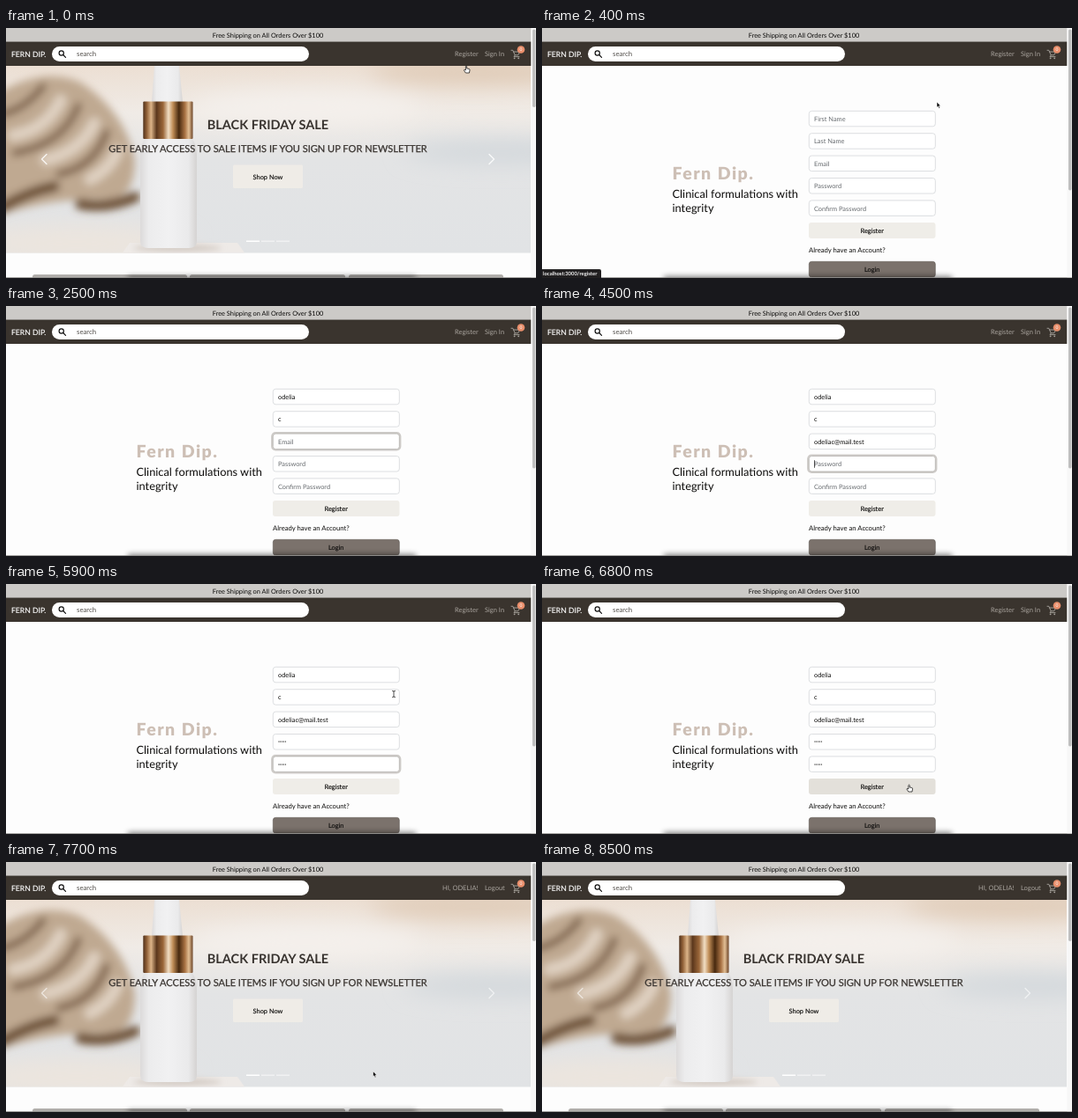
An HTML page that plays this animation: 600 by 284 pixels, repeating every 8.6 s.

```html
<!DOCTYPE html>
<html lang="en">
<head>
<meta charset="utf-8">
<title>Skincare shop sign-up</title>
<style>
  html, body { margin: 0; width: 100%; height: 100%; overflow: hidden; background: #fdfdfd; }
  svg { display: block; width: 100%; height: 100%; }
  text { font: 7.4px Lato, sans-serif; fill: #0d0c0b; text-rendering: geometricPrecision; white-space: pre; }
  .mid { text-anchor: middle; }
  .medium { stroke: #0d0c0b; stroke-width: .15px; }
  .nav text { font-size: 7.5px; fill: #aaa59f; }
  .nav .logo { font-size: 8.6px; fill: #fff; stroke: #fff; stroke-width: .15px; }
  .nav .search { font-size: 7.8px; fill: #55514d; }
  .title { font-size: 14.5px; font-weight: 700; fill: #38332f; }
  .sub { font-size: 11.05px; fill: #38332f; stroke: #38332f; stroke-width: .25px; }
  .brand { font-size: 19.5px; font-weight: 900; letter-spacing: 1.5px; fill: #cdbfb5; }
  .slogan { font-size: 12.8px; }
  .status text { font-size: 5.9px; font-weight: 700; fill: #f4f4f4; }
  .field text.empty { fill: #666a6e; }
  .field text.dots { font-size: 3.2px; }
  .line { fill: none; stroke-linecap: round; stroke-linejoin: round; }
</style>
</head>
<body>
<svg viewBox="0 0 600 284" preserveAspectRatio="none">
  <defs>
    <clipPath id="heroClip"><rect y="43" width="594" height="212.5"/></clipPath>
    <filter id="soft" x="-50%" y="-50%" width="200%" height="200%"><feGaussianBlur stdDeviation="5"/></filter>
    <filter id="haze" x="-50%" y="-80%" width="200%" height="260%"><feGaussianBlur stdDeviation="12"/></filter>
    <filter id="shade" x="-20%" y="-200%" width="140%" height="500%"><feGaussianBlur stdDeviation="3"/></filter>
    <linearGradient id="wall" x2="0" y2="1">
      <stop stop-color="#ecdfd3"/><stop offset=".25" stop-color="#f0ebe6"/>
      <stop offset=".5" stop-color="#e3e4e5"/><stop offset="1" stop-color="#e1e3e5"/>
    </linearGradient>
    <linearGradient id="gold">
      <stop stop-color="#4f301a"/><stop offset=".07" stop-color="#8f5f36"/><stop offset=".16" stop-color="#dcb488"/>
      <stop offset=".27" stop-color="#5c381d"/><stop offset=".4" stop-color="#9a6639"/><stop offset=".51" stop-color="#f1dec4"/>
      <stop offset=".6" stop-color="#c08d57"/><stop offset=".72" stop-color="#47290f"/><stop offset=".84" stop-color="#a87243"/>
      <stop offset=".92" stop-color="#e2bf95"/><stop offset="1" stop-color="#6b4326"/>
    </linearGradient>
    <linearGradient id="glass">
      <stop stop-color="#dcdada"/><stop offset=".15" stop-color="#ececed"/><stop offset=".5" stop-color="#f1f1f2"/>
      <stop offset=".85" stop-color="#eaeaeb"/><stop offset="1" stop-color="#d5d3d2"/>
    </linearGradient>
  </defs>

  <rect width="600" height="284" fill="#fdfdfd"/>

  <g id="home">
    <g clip-path="url(#heroClip)">
      <rect y="43" width="594" height="213" fill="url(#wall)"/>
      <g filter="url(#haze)">
        <ellipse cx="530" cy="50" rx="120" ry="14" fill="#dfcab6"/>
        <ellipse cx="340" cy="90" rx="130" ry="20" fill="#f4f0ec"/>
        <ellipse cx="560" cy="140" rx="110" ry="14" fill="#d3d8dc"/>
        <ellipse cx="80" cy="245" rx="130" ry="22" fill="#ece5de"/>
      </g>
      <g filter="url(#soft)">
        <path fill="#bfa991" d="M-15 78Q40 42 85 62Q135 95 146 150Q146 190 120 196Q60 190 -15 215Z"/>
        <g class="line">
          <path stroke="#e0d2c2" stroke-width="13" d="M8 122Q45 116 62 82M45 150Q85 140 100 108M95 172Q118 160 126 140"/>
          <path stroke="#73573d" stroke-width="7" d="M-5 98Q22 92 42 66M10 142Q65 132 82 88M60 166Q100 158 114 118"/>
          <path stroke="#6a4d33" stroke-width="12" d="M-5 204Q25 186 55 180M84 200Q115 206 146 192"/>
        </g>
      </g>
      <path d="M140 244H262L272 258H130Z" fill="#eeeae7"/>
      <ellipse cx="194" cy="250" rx="50" ry="4" fill="#d3cbc4" filter="url(#shade)"/>
      <path d="M168 43H196L200 84H165Z" fill="url(#glass)"/>
      <path d="M158 125H210Q216 132 216 144V242Q216 250 207 250H161Q152 250 152 242V144Q152 132 158 125Z" fill="url(#glass)"/>
      <rect x="155.300" y="83.500" width="56.200" height="42.500" rx="1" fill="url(#gold)"/>
    </g>
    <text class="title mid" x="296.500" y="115.200">BLACK FRIDAY SALE</text>
    <text class="sub mid" x="296.500" y="141.200">GET EARLY ACCESS TO SALE ITEMS IF YOU SIGN UP FOR NEWSLETTER</text>
    <rect x="257" y="155.500" width="79" height="26.500" rx="1.500" fill="#efece7"/>
    <text class="mid medium" x="296.500" y="171.500">Shop Now</text>
    <path id="arrows" class="line" stroke="#fff" stroke-width="1.300" d="M46 143.500L40.500 149L46 154.500M547 143.500L552.500 149L547 154.500"/>
    <g fill="#fff">
      <rect x="272" y="241.500" width="15" height="1.500"/>
      <rect x="289" y="241.500" width="15" height="1.500" opacity=".5"/>
      <rect x="306" y="241.500" width="15" height="1.500" opacity=".5"/>
    </g>
    <g id="cards" fill="#b1aeab">
      <rect x="30" y="280" width="175" height="10" rx="2.500"/>
      <rect x="208" y="280" width="176" height="10" rx="2.500"/>
      <rect x="388" y="280" width="175" height="10" rx="2.500"/>
    </g>
  </g>

  <g id="signup">
    <text class="brand" x="147.500" y="172">Fern Dip.</text>
    <text class="slogan" x="147.500" y="193">Clinical formulations with</text>
    <text class="slogan" x="147.500" y="209">integrity</text>
    <g id="form"></g>
    <rect id="submit" x="302" y="221" width="143.500" height="18" rx="3"/>
    <text class="mid medium" x="373.700" y="232.700">Register</text>
    <text x="302" y="254.800" style="font-size:7.700px">Already have an Account?</text>
    <rect id="login" x="302.300" y="265.300" width="143" height="17.700" rx="3" stroke="#625b56" stroke-width=".6"/>
    <text class="mid medium" x="373.700" y="276.700">Login</text>
  </g>

  <rect x="138" y="282" width="326" height="8" fill="#000" opacity=".5" filter="url(#shade)"/>
  <rect y="283.200" width="600" height="1" fill="#8d8b89"/>

  <g class="nav">
    <rect width="594.500" height="15.500" fill="#cccac7"/>
    <rect y="15.500" width="594.500" height="27.500" fill="#3a342e"/>
    <text class="logo" x="6" y="32.700">FERN DIP.</text>
    <rect x="52" y="21" width="291" height="17" rx="8.500" fill="#fff"/>
    <g class="line" stroke="#111" stroke-width="1.200"><circle cx="62.700" cy="28.500" r="2.600"/><path d="M64.700 30.500L67.500 33.300"/></g>
    <text class="search" x="80" y="32.300">search</text>
    <g id="guest"><text id="registerLink" x="508" y="32.300">Register</text><text x="542" y="32.300">Sign In</text></g>
    <g id="member"><text x="534.500" y="32.300" text-anchor="end">HI, ODELIA!</text><text x="542" y="32.300">Logout</text></g>
    <path class="line" stroke="#aaa59f" stroke-width=".9" d="M572 25.300H573.800L576.200 30.800H579.700L581.600 27H574.600M576.200 30.800L575 32.600H581"/>
    <g fill="#aaa59f"><circle cx="575.600" cy="34.300" r=".9"/><circle cx="580.200" cy="34.300" r=".9"/></g>
    <circle cx="583" cy="24.500" r="4.300" fill="#e98f6c"/>
    <text class="mid" x="583" y="26.400" style="font-size:5px;fill:#fff">0</text>
  </g>
  <text class="mid" x="296.500" y="10.700">Free Shipping on All Orders Over $100</text>

  <rect x="594.500" width="5.500" height="283.200" fill="#f7f7f7"/>
  <rect id="thumb" x="596" y="1.500" width="3.600" rx="1.800" fill="#bfbfbf"/>

  <g class="status" id="status">
    <rect x="-3" y="274" height="13" rx="2" fill="#211f20"/>
    <text x="1" y="281.200"></text>
  </g>

  <g id="cursor">
    <path id="arrow" fill="#000" stroke="#fff" stroke-width=".6" d="M0 0V6.200L1.400 5L2.400 7.300L3.500 6.800L2.500 4.600H4.300Z"/>
    <path id="hand" fill="#fff" stroke="#000" stroke-width=".7" stroke-linejoin="round" d="M-.6 .6Q0 -.4 .7 .6V3L3.300 3.500Q4.200 3.700 4 4.700L3.500 8H-.6L-2.500 5.200Q-2.500 4 -1.400 4.500L-.6 5Z"/>
    <path id="beam" class="line" stroke="#222" stroke-width=".8" d="M-1.500 -3.700Q0 -3.700 0 -2.700Q0 -3.700 1.500 -3.700M0 -2.700V2.700M-1.500 3.700Q0 3.700 0 2.700Q0 3.700 1.500 3.700"/>
  </g>
</svg>

<script>
const LOOP = 8600, TICK = 100;
const OPEN_FORM = 300, SIGNED_IN = 6900, LOADED = 7300;
const $ = id => document.getElementById(id);
const show = (node, on) => { node.style.display = on ? "" : "none"; };
const within = (t, from, to) => t >= from && t < to;
const every = (start, count) => Array.from({ length: count }, (_, i) => start + i * TICK);

function make(parent, tag, attrs) {
  const node = document.createElementNS("http://www.w3.org/2000/svg", tag);
  for (const name in attrs) node.setAttribute(name, attrs[name]);
  return parent.appendChild(node);
}

// keys: the time of each keystroke
const fields = [
  { label: "First Name", value: "odelia", focus: 600, blur: 1700, keys: every(1000, 6) },
  { label: "Last Name", value: "c", focus: 1700, blur: 2200, keys: [1900] },
  { label: "Email", value: "odeliac@mail.test", focus: 2200, blur: 4500,
    keys: [2700, 2700, 2800, 2900, 2900, 3000, 3100, 3300, 3500, ...every(3700, 8)] },
  { label: "Password", value: "•••••", focus: 4500, blur: 5100, keys: every(4600, 5) },
  { label: "Confirm Password", value: "•••••", focus: 5100, blur: 6500, keys: every(5200, 5) }
];
const caretOff = [[2500, 2700], [5700, SIGNED_IN]];

fields.forEach((field, i) => {
  const y = 94.3 + i * 25.4;
  const group = make($("form"), "g", { class: "field" });
  field.y = y;
  field.ring = make(group, "rect", { x: 301.2, y: y - 1, width: 145.1, height: 19.4, rx: 4,
    fill: "none", stroke: "#cfccc9", "stroke-width": 2.2 });
  field.box = make(group, "rect", { x: 302.3, y, width: 143, height: 17.5, rx: 3,
    fill: "#fff", "stroke-width": .7 });
  field.text = make(group, "text", { x: 308 });
  field.caret = make(group, "rect", { y: y + 4.7, width: .7, height: 8.6, fill: "#111" });
});

function drawField(field, t) {
  const typed = field.keys.filter(k => k <= t).length;
  const focused = within(t, field.focus, field.blur);
  const dots = typed > 0 && field.value[0] === "•";
  field.text.textContent = typed ? field.value.slice(0, typed) : field.label;
  field.text.setAttribute("class", typed ? (dots ? "dots" : "") : "empty");
  field.text.setAttribute("y", field.y + (dots ? 9.9 : 11.6));
  field.box.setAttribute("stroke", focused ? "#aaa6a2" : "#cfd2d5");
  show(field.ring, focused);
  show(field.caret, focused && !caretOff.some(([from, to]) => within(t, from, to)));
  field.caret.setAttribute("x", 308.2 + (typed ? field.text.getComputedTextLength() : 0));
}

// time, shape, x, y
const cursorPath = [
  [0, "hand", 521, 43], [100, "hand", 521, 38], [200, "hand", 519, 35],
  [300, "arrow", 490, 57], [400, "arrow", 447, 84], [600, "beam", 400, 101],
  [800, "beam", 392, 104], [1000, "", 392, 104],
  [5900, "beam", 439, 125], [6000, "beam", 438, 145], [6100, "beam", 436, 180],
  [6200, "hand", 430, 228], [6300, "hand", 424, 266], [6400, "hand", 419, 250], [6500, "hand", 415.5, 228],
  [SIGNED_IN, "arrow", 415.5, 228], [7600, "arrow", 415.5, 228], [8200, "", 415.5, 286]
];

function drawCursor(t) {
  const i = cursorPath.findLastIndex(p => p[0] <= t);
  const [t0, shape, x0, y0] = cursorPath[i];
  const [t1, , x1, y1] = cursorPath[i + 1] || [LOOP, "", x0, y0];
  const k = (t - t0) / (t1 - t0);
  $("cursor").setAttribute("transform", `translate(${x0 + (x1 - x0) * k} ${y0 + (y1 - y0) * k})`);
  for (const id of ["arrow", "hand", "beam"]) show($(id), id === shape);
}

function drawStatus(t) {
  const hovering = within(t, 100, 800), waiting = within(t, SIGNED_IN, 7500);
  const [box, label] = $("status").children;
  show($("status"), hovering || waiting);
  box.setAttribute("width", waiting ? 201 : 70);
  label.textContent = waiting ? "Waiting for localhost..." : "localhost:3000/register";
}

function draw() {
  const t = Math.floor(performance.now() % LOOP / TICK) * TICK;
  const signup = within(t, OPEN_FORM, SIGNED_IN), member = t >= SIGNED_IN;
  const loading = within(t, SIGNED_IN, LOADED);
  show($("signup"), signup);
  show($("home"), !signup);
  show($("cards"), !loading);
  show($("guest"), !member);
  show($("member"), member);
  $("registerLink").style.fill = within(t, 100, OPEN_FORM) ? "#d2cec9" : "";
  $("arrows").setAttribute("opacity", member ? .6 : .85);
  $("thumb").setAttribute("height", signup ? 183 : loading ? 146 : 88.5);
  $("submit").setAttribute("fill", within(t, 6500, SIGNED_IN) ? "#e3e0da" : "#efede8");
  $("login").setAttribute("fill", within(t, 6300, 6400) ? "#6d645f" : "#7b726c");
  fields.forEach(field => drawField(field, t));
  drawStatus(t);
  drawCursor(t);
  requestAnimationFrame(draw);
}
draw();
</script>
</body>
</html>
```
